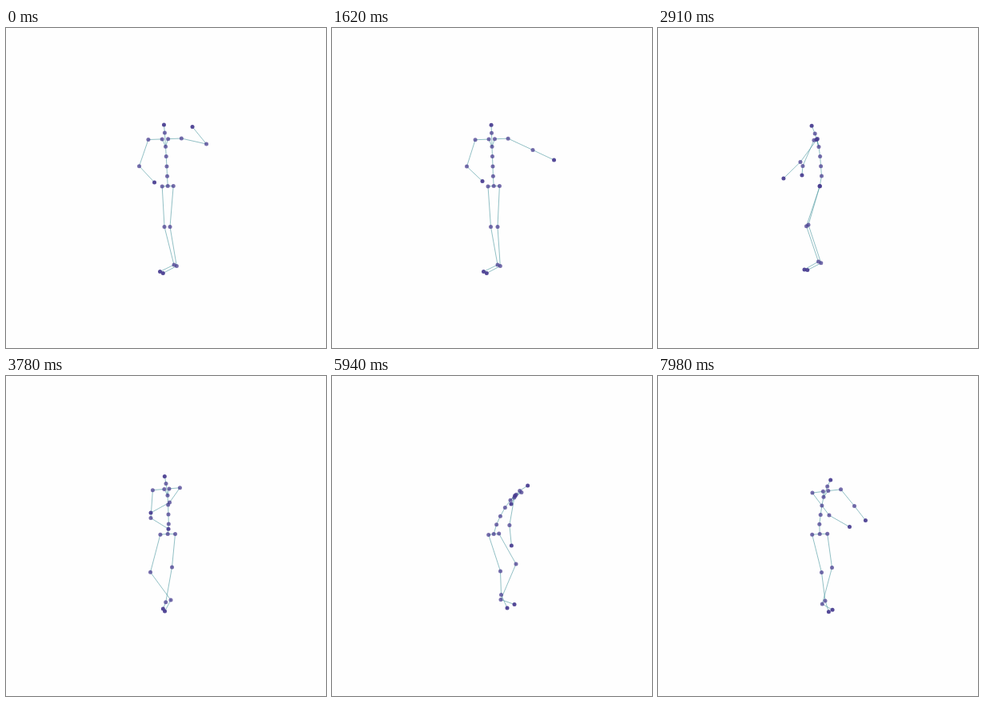
Recreate the animation shown at these times as an HTML page. Size 400 by 400 pixels, loop 8 s.

```html
<!DOCTYPE html>
<html lang="en">
<head>
<meta charset="utf-8">
<title>Stick figure</title>
<style>
  html, body { margin: 0; width: 100%; height: 100%; overflow: hidden; background: #fefefe; }
  svg { display: block; width: 100%; height: 100%; }
  path { fill: none; stroke: #4f9aa2; stroke-width: 1; stroke-opacity: .62; }
  circle { fill: #473b8f; fill-opacity: .74; }
  circle.end { fill-opacity: .92; }
</style>
</head>
<body>
<svg viewBox="0 0 400 400"><path id="bones"/><g id="dots"></g></svg>
<script>
const LOOP = 8000, STEP = 30;
const TIMES = [0, 1620, 2910, 3780, 4740, 5940, 7980];
const ROOT = [202.2, 197.5];

// Smooth spline through one value per pose.
function track(...v) {
  const last = v.length - 1;
  const speed = v.map((_, i) => {
    const a = Math.max(0, i - 1), b = Math.min(last, i + 1);
    return (v[b] - v[a]) / (TIMES[b] - TIMES[a]);
  });
  return t => {
    let i = 0;
    while (i < last - 1 && t >= TIMES[i + 1]) i++;
    const h = TIMES[i + 1] - TIMES[i], u = Math.min(1, (t - TIMES[i]) / h), w = 1 - u;
    return w * w * ((1 + 2 * u) * v[i] + u * h * speed[i])
         + u * u * ((3 - 2 * u) * v[i + 1] - w * h * speed[i + 1]);
  };
}

// The few controls of the puppet; every joint follows from them.
const controls = {
  stoop: track(0, .02, .08, .28, .5, 1, .56),
  lean: track(-2.7, -2.2, -1.2, -.2, 9.3, 20.8, 4.8),
  nod: track(-1.1, -.5, -4.8, -2, 6.4, 11.7, 4.7),
  face: track(-1, -1, -1, -.2, .75, 1, .75),
  lift: track(0, 0, 4, 16, 26, 22.5, 15),
  hips: track(7, 7.2, 0, 9.3, 8.2, 6.5, 9.5),
  shoulders: track(20.7, 20.5, 2.2, 17, 17.2, 4.5, 17.8),
  kneeL: track(198, 198.5, 185.5, 180.5, 205, 210.5, 204.5),
  kneeR: track(205, 207, 188, 207.5, 230, 230, 217.5),
  ankle: track(210, 207, 200.5, 206, 209, 211.5, 209),
  upperL: track(-11.4, -10.6, -14, -2.4, 1, -6, 21),
  foreLx: track(19, 19.5, -1, 22, 17.5, 2.5, 25.5),
  foreLy: track(20.4, 18.4, 11.6, 13.6, 20.2, 25.5, 14.5),
  upperRx: track(31.2, 30.9, -21.4, -12.9, 36.2, -7.9, 16.4),
  upperRy: track(7, 14.4, 29, 18.3, 6.2, 4.5, 20.7),
  foreRx: track(-17.5, 26.5, -21, -23.5, 29, -5, 12.5),
  foreRy: track(-21.5, 12.5, 20.5, 13, 5.5, 10, 18)
};

const chains = [
  'root spine1 spine2 spine3 chest neck head',
  'chest collarL shoulderL elbowL handL',
  'chest collarR shoulderR elbowR handR',
  'root hipL kneeL ankleL toeL',
  'root hipR kneeR ankleR toeR'
].map(c => c.split(' '));

const add = ([x, y], dx, dy) => [x + dx, y + dy];

function joints(t) {
  const c = {};
  for (const name in controls) c[name] = controls[name](t);
  const { lean, nod, face, lift } = c, stoop = Math.max(0, c.stoop);
  const p = { root: ROOT };

  // Spine: leaning, bowed against the nod of the head.
  const cx = ROOT[0] + lean, cy = 148.3 + 7 * stoop ** 1.5;
  p.chest = [cx, cy];
  p.neck = [cx + nod, 131 + 12.5 * stoop];
  p.head = [cx + 1.85 * nod, 121 + 16 * stoop];
  const bow = .6 * (.6 * lean - nod);
  for (let i = 1; i < 4; i++) {
    const f = i / 4;
    p['spine' + i] = add(ROOT, lean * f ** 1.4 + bow * (1.25 - f), (cy - ROOT[1]) * (f + .03 * stoop));
  }

  // Shoulder girdle and pelvis, mirrored left and right.
  const girdle = .45 * cy + .55 * p.neck[1], tilt = .75 + 2.5 * stoop;
  for (const [side, s] of [['L', -1], ['R', 1]]) {
    p['shoulder' + side] = [cx + .8 * nod + s * c.shoulders, girdle - s * tilt];
    p['collar' + side] = [cx + .55 * nod + .18 * s * c.shoulders, girdle - .18 * s * tilt];
    p['hip' + side] = add(ROOT, s * c.hips, .3 - s * (.2 + .5 * stoop));
  }

  // Arms; the right one flings outward near the end.
  const fling = Math.exp(-(((t - 7650) / 200) ** 2));
  p.elbowL = add(p.shoulderL, c.upperL, Math.sqrt(35 ** 2 - c.upperL ** 2));
  p.handL = add(p.elbowL, c.foreLx, c.foreLy);
  p.elbowR = add(p.shoulderR, c.upperRx + 8 * fling, c.upperRy);
  p.handR = add(p.elbowR, c.foreRx + 22 * fling, c.foreRy);

  // Legs: feet rise with the lift and point where the figure faces.
  p.kneeL = [c.kneeL, 248.5 - .2 * lift];
  p.kneeR = [c.kneeR, 248.5 - .6 * lift];
  p.ankleL = [c.ankle, 296 - lift];
  p.ankleR = add(p.ankleL, 8.4 * face ** 2 - 1.9 * face - 7, 1.5 + 4.5 * stoop);
  p.toeL = add(p.ankleL, 12.5 * face - 5, 8.5 + .35 * lift);
  p.toeR = add(p.ankleR, 17 * face, 9 - 3 * stoop);
  return p;
}

const bones = document.getElementById('bones');
const dots = {};
for (const name of new Set(chains.flat())) {
  const dot = document.createElementNS('http://www.w3.org/2000/svg', 'circle');
  dot.setAttribute('r', 2.5);
  if (/head|hand|toe/.test(name)) dot.setAttribute('class', 'end');
  document.getElementById('dots').append(dot);
  dots[name] = dot;
}

function draw(t) {
  const p = joints(t);
  const at = name => p[name].map(v => v.toFixed(2)).join(' ');
  bones.setAttribute('d', chains.map(c => 'M' + c.map(at).join('L')).join(''));
  for (const name in dots) {
    dots[name].setAttribute('cx', p[name][0]);
    dots[name].setAttribute('cy', p[name][1]);
  }
}

const start = performance.now();
function tick() {
  const t = (performance.now() - start) % LOOP;
  draw(Math.floor(t / STEP) * STEP);
  requestAnimationFrame(tick);
}
tick();
</script>
</body>
</html>
```
